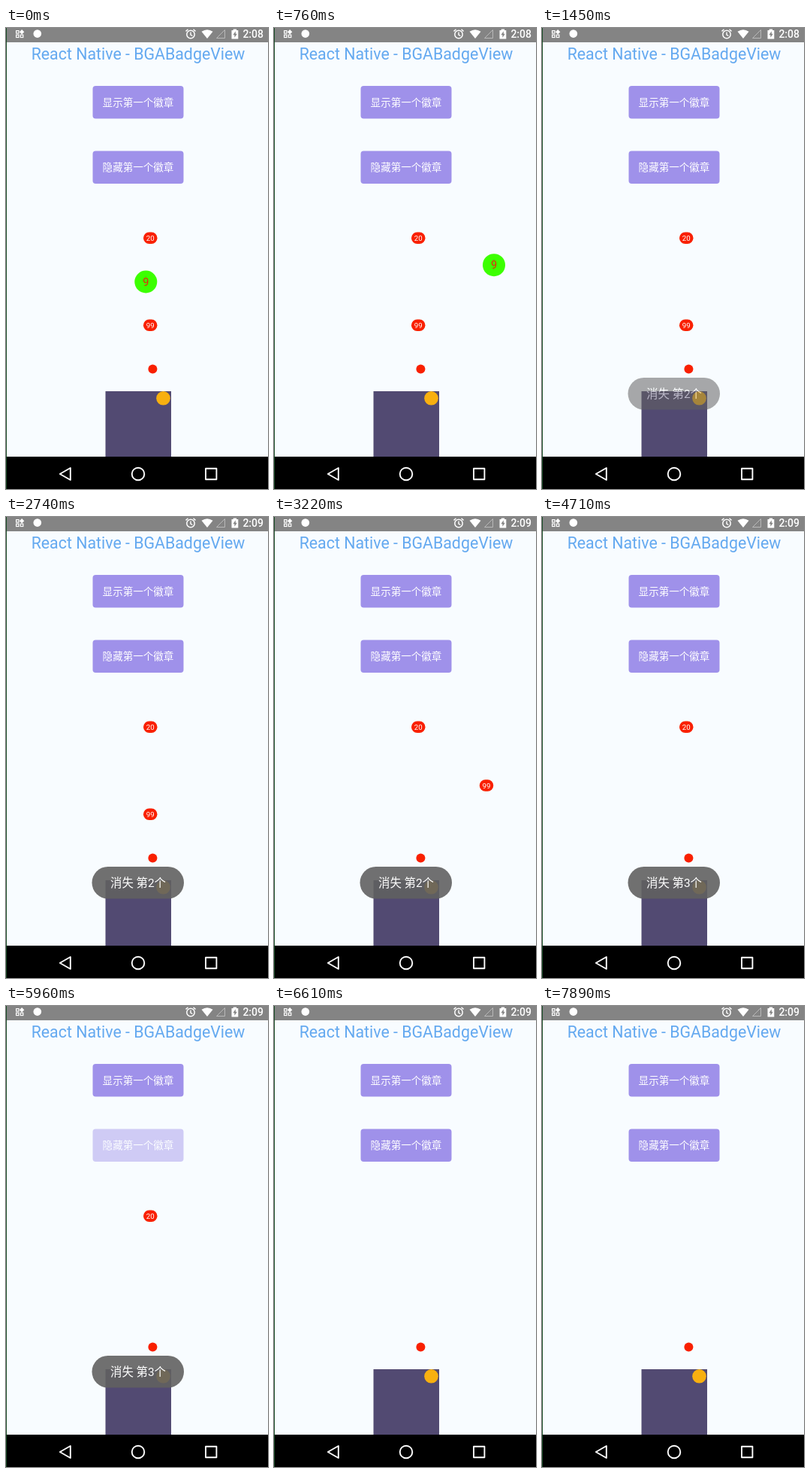
Recreate the animation shown at these times as an HTML page. Size 349 px wide and 613 px high, loop 8 s.

```html
<!DOCTYPE html>
<html lang="zh">
<head>
<meta charset="utf-8">
<title>BGABadgeView</title>
<style>
  html, body { margin: 0; width: 100%; height: 100%; overflow: hidden; background: #f8fcff; }
  svg { display: block; width: 100%; height: 100%; }
  text { font-family: Roboto, "Noto Sans CJK SC", "Noto Sans CJK", sans-serif; text-anchor: middle; }
  .title { font-size: 21.35px; fill: #64a9f0; }
  .button rect { fill: #9f91ea; }
  .button text { font-size: 13.55px; fill: #fff; }
  .count { font-size: 9.7px; fill: #fff; }
  .clock { font-size: 14px; font-weight: 500; fill: #fff; text-anchor: end; }
  .toast { opacity: 0; animation: toast 8s infinite; }
  .toast.second { animation-delay: 3s; }
  .toast rect { fill: #616161; fill-opacity: .9; }
  .toast text { font-size: 15.4px; fill: #fff; }
  .line { fill: none; stroke: #fff; }
  .press { animation: press 8s infinite; }
  .until-hidden { animation: hide 8s step-end infinite; }
  .before { animation: before 8s step-end infinite; }
  .after { animation: after 8s step-end infinite; }

  @keyframes toast {
    0%, 16.375% { opacity: 0; animation-timing-function: cubic-bezier(.25, .46, .45, .94); }
    21.375% { opacity: 1; animation-timing-function: linear; }
    40.125% { opacity: 1; animation-timing-function: cubic-bezier(.55, .085, .68, .53); }
    45.125%, 100% { opacity: 0; }
  }
  @keyframes press {
    0%, 73.5% { opacity: 1; }
    75.4%, 76.2% { opacity: .35; }
    79.3%, 100% { opacity: 1; }
  }
  @keyframes hide { 0% { opacity: 1; } 76.8%, 100% { opacity: 0; } }
  @keyframes before { 0% { opacity: 1; } 22.75%, 100% { opacity: 0; } }
  @keyframes after { 0% { opacity: 0; } 22.75%, 100% { opacity: 1; } }
</style>
</head>
<body>
<svg viewBox="0 0 349 613" preserveAspectRatio="none">
  <rect width="349" height="613" fill="#f8fcff"/>

  <!-- status bar -->
  <rect width="349" height="19" fill="#848484"/>
  <g class="line" stroke-width="1.2">
    <rect x="13.6" y="3.6" width="3.4" height="3.4"/>
    <rect x="13.6" y="9.1" width="3.4" height="3.4"/>
    <rect x="19.4" y="9.1" width="3.4" height="3.4"/>
    <circle cx="246" cy="8.5" r="5.2" stroke-width="1.5"/>
    <path d="M246 5.5V9l2.4 1.5M239.5 4.4l3-2.6M252.5 4.4l-3-2.6" stroke-width="1.4"/>
    <path d="M280.5 13.5h11v-11z" stroke="#b9b9b9" stroke-width="1"/>
  </g>
  <path d="M21.1 2l3.2 3.2-3.2 3.2-3.2-3.2z" fill="#fff"/>
  <circle cx="41.8" cy="7.6" r="5.3" fill="#fff"/>
  <path d="M260.5 4.8q7.5-5 15 0L268 14z" fill="#fff"/>
  <path d="M300.5 3h2.2V1.5h4.4V3h2.2v11.6h-8.8z" fill="#fff"/>
  <path d="M305.8 4.2l-3.4 5h2v3.6l3.4-5h-2z" fill="#848484"/>
  <text class="clock before" x="343" y="13.3">2:08</text>
  <text class="clock after" x="343" y="13.3">2:09</text>

  <text class="title" x="176" y="42">React Native - BGABadgeView</text>

  <g class="button">
    <rect x="115.5" y="77" width="121" height="43.5" rx="4"/>
    <text x="176" y="103.7">显示第一个徽章</text>
  </g>
  <g class="button press">
    <rect x="115.5" y="163.5" width="121" height="43.5" rx="4"/>
    <text x="176" y="190.4">隐藏第一个徽章</text>
  </g>

  <g class="until-hidden">
    <rect x="183" y="271.5" width="18.5" height="15.5" rx="7.75" fill="#f92000"/>
    <text class="count" x="192.2" y="282.8">20</text>
  </g>
  <circle cx="195.4" cy="453.5" r="6" fill="#f92000"/>

  <!-- picture tile -->
  <rect x="132.5" y="483" width="87.5" height="87" fill="#524a72"/>
  <circle cx="209.5" cy="492.3" r="9.3" fill="#f8b010"/>

  <g id="drags"></g>

  <g class="toast">
    <rect x="114.5" y="465" width="122.5" height="42.5" rx="21.25"/>
    <text x="176" y="491.7">消失 第2个</text>
  </g>
  <g class="toast second">
    <rect x="114.5" y="465" width="122.5" height="42.5" rx="21.25"/>
    <text x="176" y="491.7">消失 第3个</text>
  </g>

  <!-- navigation bar -->
  <rect y="570" width="349" height="43"/>
  <g class="line" stroke-width="1.9" stroke-linejoin="round">
    <path d="M71.8 593l14-8v16z"/>
    <circle cx="176" cy="593" r="8.3"/>
    <rect x="266" y="585.8" width="14.4" height="14.4"/>
  </g>
  <rect width="1" height="613" fill="#174a24"/>
</svg>

<script>
const LOOP = 8000, BURST = 470;
const layer = document.getElementById('drags');

// burst particles: offset x, offset y, radius
const sparks = [
  [-11, 0, 1.8], [-7, -5, 1.8], [-5, 1, 1.9], [-1, -7, 1.9], [7, -7, 1.6],
  [4, -5, 1.6], [-3, 5, 1.8], [0, 1, 2.4], [1, 9, 3.1], [5, 6, 1.6],
  [8, 7, 1.8], [2, -3, 1.7], [-9, -6, 1.5], [-4, -3, 1.5]
];

const badges = [
  { color: '#3cff00', w: 30, h: 30, reach: 80, label: '9', size: 14.5, ink: '#e3280f', base: 5.2,
    path: [[210, 186.3, 337.5], [700, 290, 318], [830, 296.5, 312]] },
  { color: '#f92000', w: 18.5, h: 15.5, reach: 50, label: '99', size: 9.7, ink: '#fff', base: 3.5,
    path: [[2740, 192.2, 395.3], [3220, 283, 357], [3500, 284.6, 354], [3830, 284, 345.5]] }
];

function add(tag, attrs, parent) {
  const el = document.createElementNS('http://www.w3.org/2000/svg', tag);
  return parent.appendChild(set(el, attrs));
}

function set(el, attrs) {
  for (const k in attrs) el.setAttribute(k, attrs[k]);
  return el;
}

function seeded(seed) {
  return () => (seed = seed * 16807 % 2147483647) / 2147483647;
}

function build(b, i) {
  const rnd = seeded(4711 + i * 977);
  b.release = b.path[b.path.length - 1][0];
  b.bridge = add('path', { fill: b.color }, layer);
  b.node = add('g', {}, layer);
  add('rect', { x: -b.w / 2, y: -b.h / 2, width: b.w, height: b.h, rx: b.h / 2, fill: b.color }, b.node);
  add('text', { y: b.base, 'font-size': b.size, fill: b.ink }, b.node).textContent = b.label;
  b.sparks = sparks.map(([x, y, r]) => ({
    x, y, r,
    drift: b.h * (rnd() - .5) * (rnd() < .3 ? 1.7 : 1),
    lift: b.h * (.2 + .2 * rnd()),
    cut: .4 * rnd(),
    el: add('circle', { fill: b.color }, layer)
  }));
}

function place(path, t) {
  if (t <= path[0][0]) return path[0].slice(1);
  for (let i = 1; i < path.length; i++) {
    const [t0, x0, y0] = path[i - 1], [t1, x1, y1] = path[i];
    if (t < t1) {
      let k = (t - t0) / (t1 - t0);
      if (i === 1) k = (1 - Math.cos(Math.PI * k)) / 2;
      return [x0 + (x1 - x0) * k, y0 + (y1 - y0) * k];
    }
  }
  return path[path.length - 1].slice(1);
}

// elastic neck between the resting place and the dragged badge
function neck(b, x, y) {
  const [, hx, hy] = b.path[0];
  const dx = x - hx, dy = y - hy, d = Math.hypot(dx, dy);
  if (d < 1 || d > b.reach) return '';
  const r = b.h / 2 * (1 - .8 * d / b.reach), R = b.h / 2;
  const nx = -dy / d, ny = dx / d, mid = `${hx + dx / 2} ${hy + dy / 2}`;
  return `M${hx + nx * r} ${hy + ny * r}Q${mid} ${x + nx * R} ${y + ny * R}` +
    `L${x - nx * R} ${y - ny * R}Q${mid} ${hx - nx * r} ${hy - ny * r}` +
    `A${r} ${r} 0 0 1 ${hx + nx * r} ${hy + ny * r}Z`;
}

function draw(b, t) {
  const [x, y] = place(b.path, t);
  const held = t < b.release;
  set(b.node, { transform: `translate(${x} ${y})`, opacity: held ? 1 : 0 });
  set(b.bridge, { d: held ? neck(b, x, y) : '' });

  const p = Math.pow(Math.max(0, (t - b.release) / BURST), 1.2);
  for (const s of b.sparks) {
    const f = p / (1 - s.cut), u = f * 1.4;
    const shown = !held && f < 1;
    set(s.el, {
      cx: x + s.x + s.drift * u,
      cy: y + s.y - 4 * s.lift * u * (1 - u),
      r: shown ? s.r : 0,
      opacity: f > .7 ? Math.max(0, (1 - f) / .3) : 1
    });
  }
}

badges.forEach(build);
let start;
function tick(now) {
  start ??= now;
  const t = (now - start) % LOOP;
  badges.forEach(b => draw(b, t));
  requestAnimationFrame(tick);
}
requestAnimationFrame(tick);
</script>
</body>
</html>
```
